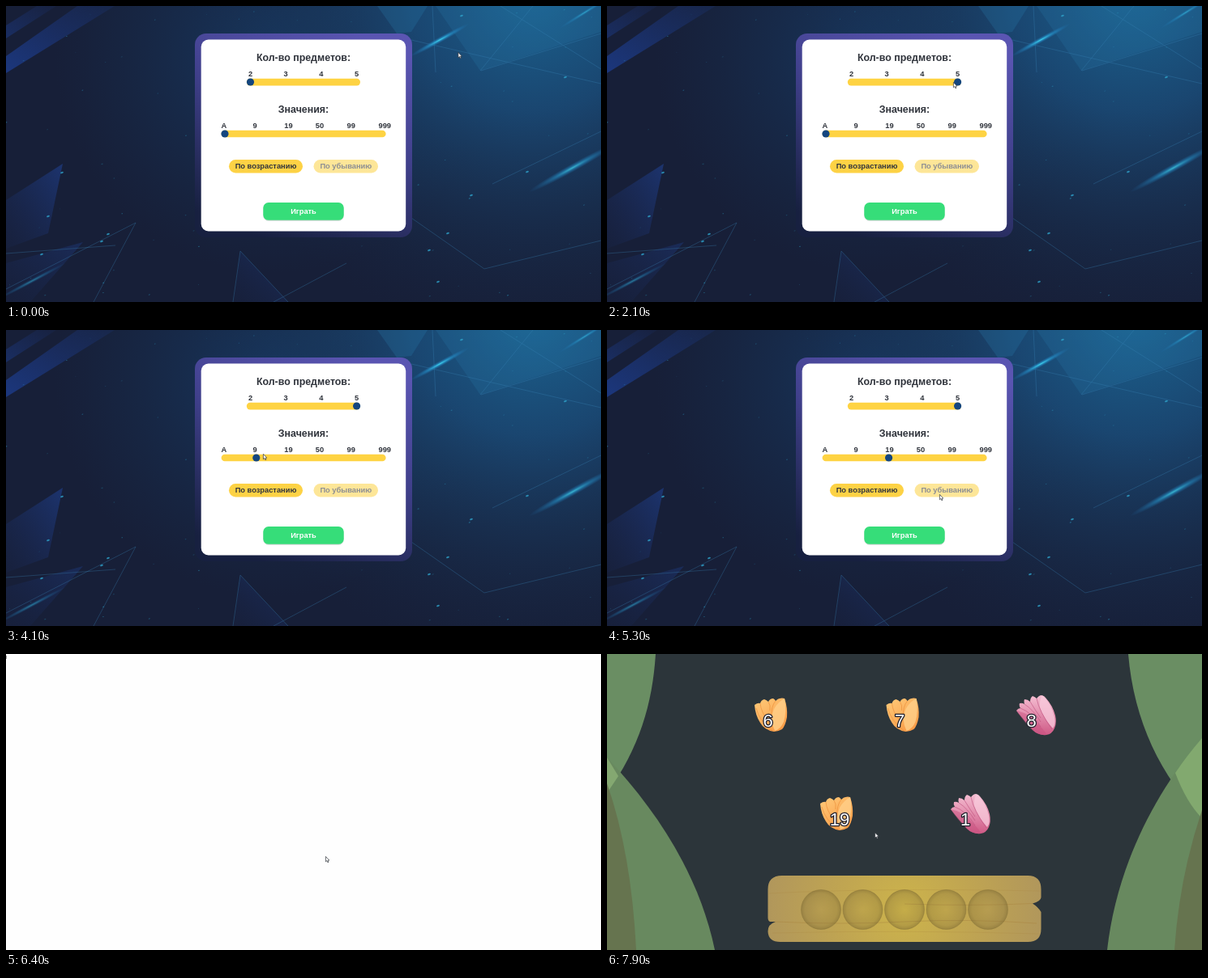
An HTML page that plays this animation: 734 px wide and 366 px high, repeating every 8 s.

```html
<!DOCTYPE html>
<html lang="ru">
<head>
<meta charset="utf-8">
<title>Сортировка</title>
<style>
html, body { margin: 0; width: 100%; height: 100%; overflow: hidden; background: #171f38; }
svg { display: block; width: 734px; height: 366px; }
text { font-family: "Liberation Sans", Arial, sans-serif; text-anchor: middle; }
#menu text { font-weight: bold; font-size: 9.3px; fill: #30343c; }
#menu text.title { font-size: 12.4px; }
#play text { fill: #fff; }
.num { font-size: 22px; fill: #fff; stroke: #20202c; stroke-width: 2.6px; stroke-linejoin: round; paint-order: stroke; }
</style>
</head>
<body>
<svg viewBox="0 0 734 366" xmlns="http://www.w3.org/2000/svg">
<defs>
  <radialGradient id="sky" gradientUnits="userSpaceOnUse" cx="650" cy="-20" r="430">
    <stop offset="0" stop-color="#1b6491"/>
    <stop offset=".35" stop-color="#1a4a76" stop-opacity=".9"/>
    <stop offset="1" stop-color="#182846" stop-opacity="0"/>
  </radialGradient>
  <radialGradient id="haze" gradientUnits="userSpaceOnUse" cx="330" cy="60" r="270">
    <stop offset="0" stop-color="#173f6c" stop-opacity=".75"/>
    <stop offset="1" stop-color="#173458" stop-opacity="0"/>
  </radialGradient>
  <linearGradient id="band" x1="0" y1="1" x2="1" y2="0">
    <stop offset="0" stop-color="#1d3f94" stop-opacity=".75"/>
    <stop offset="1" stop-color="#1d3f94" stop-opacity=".15"/>
  </linearGradient>
  <linearGradient id="shard" x1="1" y1="0" x2="0" y2="1">
    <stop offset="0" stop-color="#1f3f8c" stop-opacity=".65"/>
    <stop offset="1" stop-color="#1b2f66" stop-opacity=".1"/>
  </linearGradient>
  <radialGradient id="flare">
    <stop offset="0" stop-color="#3fd3ee"/>
    <stop offset=".4" stop-color="#2596cf" stop-opacity=".65"/>
    <stop offset="1" stop-color="#1f6fb0" stop-opacity="0"/>
  </radialGradient>
  <linearGradient id="frame" x1=".75" y1="0" x2=".3" y2="1">
    <stop offset="0" stop-color="#5a55b2"/>
    <stop offset=".45" stop-color="#3f3f8a"/>
    <stop offset="1" stop-color="#172040"/>
  </linearGradient>
  <linearGradient id="orange" x1=".1" y1="0" x2=".8" y2="1">
    <stop offset="0" stop-color="#ffc978"/>
    <stop offset="1" stop-color="#f99a45"/>
  </linearGradient>
  <linearGradient id="pink" x1=".6" y1="0" x2=".6" y2="1">
    <stop offset="0" stop-color="#f5bed2"/>
    <stop offset="1" stop-color="#cf5a86"/>
  </linearGradient>
  <radialGradient id="wood" gradientUnits="userSpaceOnUse" cx="367" cy="316" r="175">
    <stop offset="0" stop-color="#cdb44b"/>
    <stop offset=".5" stop-color="#bfa452"/>
    <stop offset="1" stop-color="#b0965c"/>
  </radialGradient>
  <radialGradient id="hole">
    <stop offset="0" stop-color="#8c7838" stop-opacity=".12"/>
    <stop offset=".8" stop-color="#806d35" stop-opacity=".3"/>
    <stop offset="1" stop-color="#75632f" stop-opacity=".5"/>
  </radialGradient>
  <g id="orangeTulip">
    <path fill="url(#orange)" d="M-20-12Q-16-15-13-14Q-12-18-8-19Q-5-18-3-16Q-1-20 3-20Q5-19 6-17Q9-20 11-20Q14-21 17-20Q21-8 20 3Q18 14 14 18Q9 21 4 21Q-8 19-13 10Q-19 1-20-12Z"/>
    <path fill="#ffd08a" opacity=".8" d="M17-20Q20-4 16 9Q12 18 5 20Q-2 6 4-7Q9-16 17-20Z"/>
    <path fill="none" stroke="#e98a35" stroke-width=".8" opacity=".75" d="M-13-14Q-12-3-3 8M-3-16Q0-12-1-5M6-17Q0-10 1 4M-18-8Q-14 8 2 20"/>
  </g>
  <g id="pinkTulip">
    <path fill="url(#pink)" d="M-24-6Q-22-9-19-9Q-21-12-20-15Q-17-16-14-14Q-15-18-14-20Q-10-20-7-17Q-7-22-4-24Q-1-23 1-21Q4-25 7-25Q11-24 12-22Q21-12 24 0Q26 9 23 16Q20 23 13 24Q3 25-4 18Q-13 8-24-6Z"/>
    <path fill="#f8cbdc" opacity=".75" d="M8-25Q19-15 23 2Q25 11 21 16Q10 4 5-10Q4-19 8-25Z"/>
    <path fill="#c64e7d" opacity=".45" d="M-24-6Q-8-3 1 9Q9 16 14 24Q3 25-4 18Q-15 8-24-6Z"/>
    <path fill="none" stroke="#bd4f7c" stroke-width=".8" opacity=".75" d="M-19-9Q-5-4 6 14M-14-14Q-3-7 6 8M-7-17Q-1-7 6 3M1-21Q4-5 20 17"/>
  </g>
</defs>

<g id="menu">
  <rect width="734" height="366" fill="#171f38"/>
  <rect width="734" height="366" fill="url(#haze)"/>
  <rect width="734" height="366" fill="url(#sky)"/>
  <path fill="url(#band)" d="M0 62L88 0H134L0 83Z"/>
  <path fill="url(#band)" opacity=".6" d="M0 24L38 0H62L0 40Z"/>
  <path fill="url(#shard)" d="M70 195L0 240V300L52 281Z"/>
  <path fill="url(#shard)" opacity=".6" d="M0 318L95 292L30 366H0Z"/>
  <path fill="url(#shard)" opacity=".6" d="M289 303L348 366H280Z"/>
  <path fill="#2c83b8" opacity=".22" d="M458 0H520L500 32L482 34Z"/>
  <path fill="#2b7fae" opacity=".2" d="M530 0H734V32L585 80Z"/>
  <g fill="none" stroke="#3a86b8" stroke-width=".7" opacity=".45">
    <path d="M526 0L530 82M500 42L734 96M586 80L734 34M610 0L734 78M650 0L585 80"/>
    <path d="M0 350L160 268L108 366M0 306L135 296M289 303L348 366M289 303L280 366M330 366L420 318"/>
    <path d="M500 262L590 325L734 290M600 220L734 155"/>
  </g>
  <g fill="url(#flare)">
    <ellipse rx="42" ry="3.6" transform="translate(535 42) rotate(-29)"/>
    <ellipse rx="62" ry="5" opacity=".8" transform="translate(699 200) rotate(-29)"/>
    <ellipse rx="38" ry="2.5" opacity=".6" transform="translate(714 8) rotate(-32)"/>
    <ellipse rx="48" ry="2.6" opacity=".5" transform="translate(32 340) rotate(-28)"/>
  </g>
  <g id="sparks" fill="#2ea0c8"></g>

  <rect x="233" y="34" width="268" height="252" rx="14" fill="url(#frame)"/>
  <rect x="240.7" y="41.5" width="252.5" height="237" rx="9" fill="#fff"/>
  <text class="title" x="367" y="67.7">Кол-во предметов:</text>
  <text class="title" x="367" y="131.7">Значения:</text>
  <g id="labels"></g>
  <g fill="#fed343">
    <rect x="296.8" y="89.8" width="140.2" height="8.6" rx="4.3"/>
    <rect x="265.6" y="153.7" width="203" height="8.6" rx="4.3"/>
  </g>
  <g fill="#14467f">
    <circle id="countKnob" cy="94" r="4.6"/>
    <circle id="valueKnob" cy="158" r="4.6"/>
  </g>
  <g id="asc"><rect x="275" y="190" width="91" height="16.5" rx="8.2" fill="#fdd245"/><text x="320.5" y="201.3">По возрастанию</text></g>
  <g id="desc"><rect x="379.5" y="190" width="79.5" height="16.5" rx="8.2" fill="#fdd245"/><text x="419.3" y="201.3">По убыванию</text></g>
  <g id="play">
    <rect x="317.3" y="244.4" width="99.4" height="21.6" rx="6.5" fill="#000" opacity=".13"/>
    <rect id="playFace" x="317.3" y="243" width="99.4" height="21.8" rx="6.5"/>
    <text x="367" y="256.8">Играть</text>
  </g>
</g>

<g id="blank">
  <rect width="734" height="366" fill="#fefefe"/>
  <rect y="2" width="1" height="4" fill="#999"/>
</g>

<g id="game">
  <rect width="734" height="366" fill="#2c353a"/>
  <path fill="#6a8e63" d="M0 0H60C56 62 40 116 0 172Z"/>
  <path fill="#68895f" d="M0 128C62 194 114 274 133 366H0Z"/>
  <path fill="#84a871" d="M0 128L14 151L0 172Z"/>
  <path fill="#66744f" d="M0 160Q30 246 36 366H0Z"/>
  <path fill="#6a8e63" d="M643 0H734V203C684 152 650 84 643 0Z"/>
  <path fill="#68895f" d="M734 104C672 176 628 268 617 366H734Z"/>
  <path fill="#82a96f" d="M734 104Q715 126 701 147Q715 184 734 203Z" transform="translate(0 0)"/>
  <path fill="#66744f" d="M734 193Q706 276 700 366H734Z"/>
  <path fill="url(#wood)" d="M216 274H519Q535.5 274 535.5 291V301Q535 306 525 308.5Q532 313 535.5 319V340Q535.5 356 519 356H214Q199 356 198.5 343Q198.500 334 208 331H201Q198.500 330 198.500 326V291Q198.500 274 216 274Z"/>
  <g fill="none" stroke="#a8833f" opacity=".45">
    <path d="M207 331Q290 335 367 331T530 333M525 308.500Q450 312 367 309"/>
    <path stroke-width=".5" d="M200 296Q330 289 534 293M204 345Q370 341 532 346"/>
  </g>
  <g id="holes" fill="url(#hole)" stroke="#8a763a" stroke-opacity=".45"></g>
  <g id="tulips"></g>
</g>

<path id="cursor" fill="#fff" stroke="#30343c" stroke-width=".7" stroke-linejoin="round" d="M.4.4V6.800L1.900 5.500L2.900 7.800L3.900 7.300L3 5.200L4.800 5.100Z"/>
</svg>

<script>
const LOOP = 8000, TICK = 100;
const $ = id => document.getElementById(id);

function add(parent, tag, attrs, text = "") {
  const el = document.createElementNS("http://www.w3.org/2000/svg", tag);
  for (const key in attrs) el.setAttribute(key, attrs[key]);
  el.textContent = text;
  parent.append(el);
}

let seed = 41;
const rand = () => (seed = seed * 16807 % 2147483647) / 2147483647;

function spark(x, y, r, opacity) {
  add($("sparks"), "ellipse", { rx: r, ry: r * .55, opacity, transform: `translate(${x} ${y}) rotate(-20)` });
}
for (let i = 0; i < 70; i++) spark(rand() * 734, rand() * 366, .5 + rand() * .8, .15 + rand() * .35);
[[118, 291], [126, 282], [69, 206], [52, 260], [44, 307], [545, 281], [574, 234],
 [522, 302], [643, 205], [533, 341], [562, 12], [690, 88]].forEach(([x, y]) => spark(x, y, 2, .8));

const label = (text, x, y) => add($("labels"), "text", { x, y }, text);
[2, 3, 4, 5].forEach((n, i) => label(n, 301.5 + 43.7 * i, 87.3));
[["А", 268.8], [9, 307], [19, 348.4], [50, 387], [99, 425.7], [999, 467.3]]
  .forEach(([text, x]) => label(text, x, 151.3));

for (let i = 0; i < 5; i++) add($("holes"), "circle", { cx: 264 + 51.5 * i, cy: 316, r: 24.5 });
[["orange", 202, 75, 6, 198.7], ["orange", 364.5, 75, 7, 361], ["pink", 529, 76, 8, 523.5],
 ["orange", 283, 197, 19, 287], ["pink", 448, 198, 1, 442]].forEach(([kind, x, y, n, nx]) => {
  add($("tulips"), "use", { href: `#${kind}Tulip`, x, y });
  add($("tulips"), "text", { class: "num", x: nx, y: y < 100 ? 90.3 : 212.3 }, n);
});

// Pointer path: time, x, y
const path = [
  [0, 557.5, 57], [300, 500, 88], [600, 390, 104], [900, 305, 82],
  [1000, 305, 82], [1200, 300, 92.5], [1300, 300, 92.5], [2100, 427, 94],
  [2400, 427, 94], [3200, 270, 154], [3600, 270, 154], [4100, 317, 153],
  [4300, 339, 152.5], [4600, 339, 152.5], [5300, 410, 203], [5500, 410, 203],
  [6300, 394, 250], [7100, 394, 250], [7900, 330.3, 220.5], [LOOP, 330.3, 220.5]
];

function pointer(t) {
  const i = path.findIndex(p => p[0] > t);
  const [t0, x0, y0] = path[i - 1], [t1, x1, y1] = path[i];
  const k = (t - t0) / (t1 - t0);
  return [x0 + (x1 - x0) * k, y0 + (y1 - y0) * k];
}

const snap = (x, start, step, max) =>
  start + step * Math.max(0, Math.min(max, Math.round((x - start) / step)));
const show = (id, on) => $(id).setAttribute("visibility", on ? "visible" : "hidden");

function draw(t) {
  const [x, y] = pointer(t);
  const countX = t < 1400 ? 301.5 : pointer(Math.min(t, 2100))[0];
  const valueX = t < 3700 ? 270 : pointer(Math.min(t, 4300))[0];
  const reversed = t >= 5500;
  const hover = x > 317 && x < 417 && y > 243 && y < 265;

  show("menu", t < 6400);
  show("blank", t >= 6400 && t < 6500);
  show("game", t >= 6500);
  $("cursor").setAttribute("transform", `translate(${x} ${y})`);
  $("countKnob").setAttribute("cx", snap(countX, 301.5, 43.7, 3));
  $("valueKnob").setAttribute("cx", snap(valueX, 270, 38.8, 5));
  $("asc").setAttribute("opacity", reversed ? .55 : 1);
  $("desc").setAttribute("opacity", reversed ? 1 : .55);
  $("playFace").setAttribute("fill", hover ? "#4bc47c" : "#36dd79");
}

const start = performance.now();
function loop() {
  const t = (performance.now() - start) % LOOP;
  draw(Math.floor(t / TICK) * TICK);
  requestAnimationFrame(loop);
}
loop();
</script>
</body>
</html>
```
